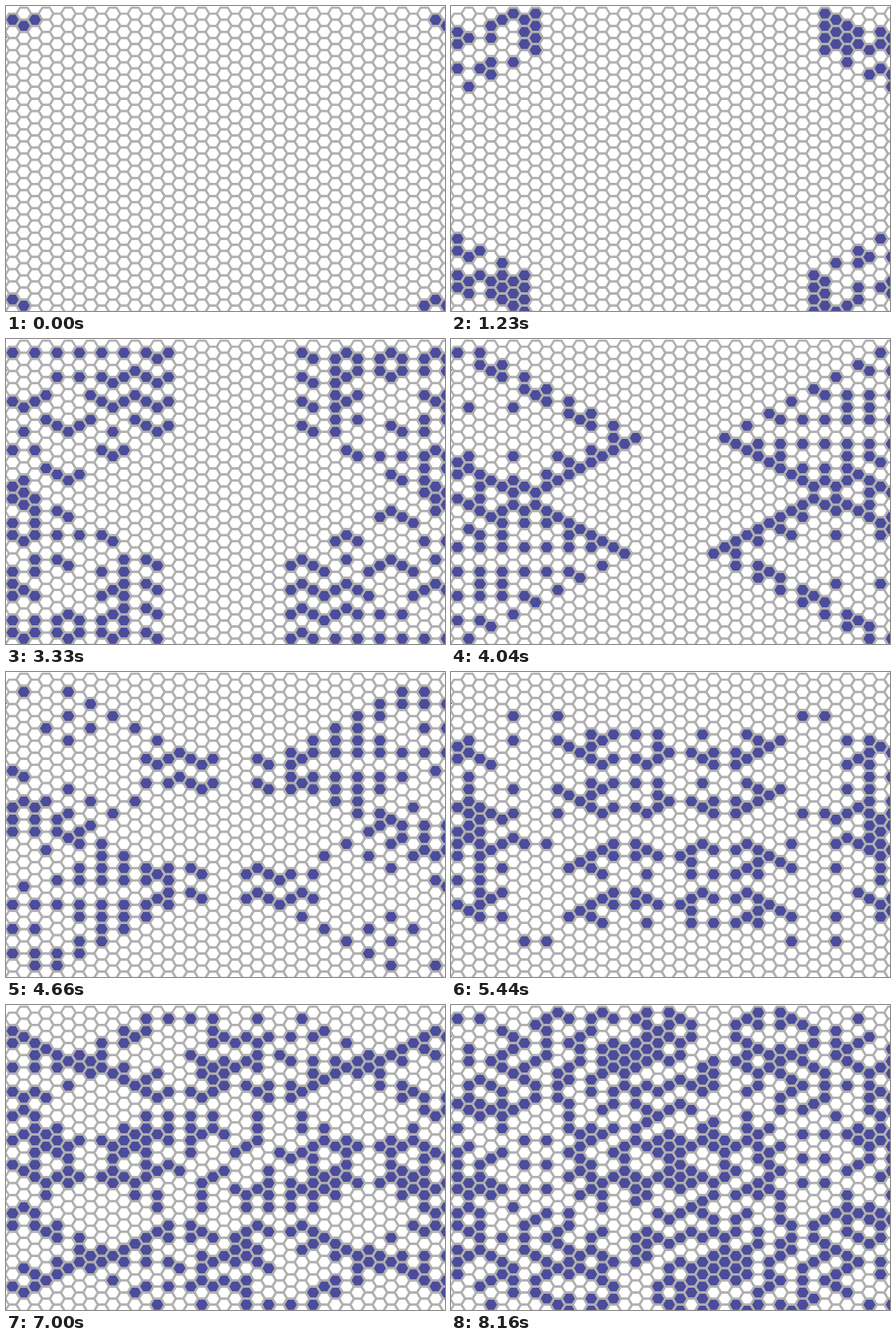
These frames come from a looping animation (514 by 357 pixels, 8330 ms). An HTML page with a canvas:

```html
<!DOCTYPE html>
<html>
<head>
<meta charset="utf-8">
<style>
  html, body { margin: 0; width: 100%; height: 100%; overflow: hidden; background: #fff; }
  canvas { display: block; }
</style>
</head>
<body>
<canvas id="stage" width="514" height="357"></canvas>
<script>
// Hexagonal parity automaton: a cell lives when an odd number of its six
// neighbours lived. Cells sit where x + y is odd; everything outside is dead.
const COLS = 40, ROWS = 50, GENERATIONS = 26;
const LOOP = 8330;
// Start of every fourth generation; the pace is even in between.
const PACE = [0, 910, 2010, 3330, 4660, 6220, 7772, 9324];

const key = (x, y) => y * COLS + x;
const sixAngles = offset => Array.from({ length: 6 }, (_, i) => (i + offset) * Math.PI / 3);

const cells = [];
for (let y = 0; y < ROWS; y++)
  for (let x = (y + 1) % 2; x < COLS; x += 2) cells.push({ x, y, id: key(x, y) });

function neighbours({ x, y }) {
  return sixAngles(.5)
    .map(a => [x + Math.round(Math.cos(a)), y + Math.round(2 * Math.sin(a))])
    .filter(([nx, ny]) => nx >= 0 && nx < COLS && ny >= 0 && ny < ROWS)
    .map(([nx, ny]) => key(nx, ny));
}

function step(live) {
  const isOdd = cell => cell.near.filter(id => live.has(id)).length % 2;
  return new Set(cells.filter(isOdd).map(cell => cell.id));
}

const ctx = document.getElementById('stage').getContext('2d');
const DX = 13.03, DY = 7.12, RADIUS = DX / 1.5;

function hexagon({ x, y }) {
  const path = new Path2D();
  for (const a of sixAngles(0))
    path.lineTo(7.8 + x * DX + RADIUS * Math.cos(a),
                9 + y * DY + DY * Math.sign(Math.round(2 * Math.sin(a))));
  path.closePath();
  return path;
}

for (const cell of cells) {
  cell.near = neighbours(cell);
  cell.shape = hexagon(cell);
}

// One seed in each corner of the grid.
const generations = [step(new Set([key(1, 0), key(39, 0), key(0, 49), key(38, 49)]))];
while (generations.length < GENERATIONS) generations.push(step(generations.at(-1)));

function draw(live) {
  ctx.fillStyle = '#fff';
  ctx.fillRect(0, 0, 514, 357);
  ctx.fillStyle = '#4c4c9c';
  for (const cell of cells) if (live.has(cell.id)) ctx.fill(cell.shape);
  ctx.strokeStyle = '#b0b0b0';
  ctx.lineWidth = 2.5;
  for (const cell of cells) ctx.stroke(cell.shape);
  ctx.fillStyle = '#222';
  ctx.fillRect(0, 36, 1, 1);
}

function generationAt(time) {
  const i = PACE.findLastIndex(start => start <= time);
  const part = (time - PACE[i]) / (PACE[i + 1] - PACE[i]);
  return Math.min(GENERATIONS - 1, Math.floor(4 * (i + part)));
}

let shown = -1;
const begin = performance.now();
function tick() {
  const index = generationAt((performance.now() - begin) % LOOP);
  if (index !== shown) draw(generations[shown = index]);
  requestAnimationFrame(tick);
}
tick();
</script>
</body>
</html>
```
